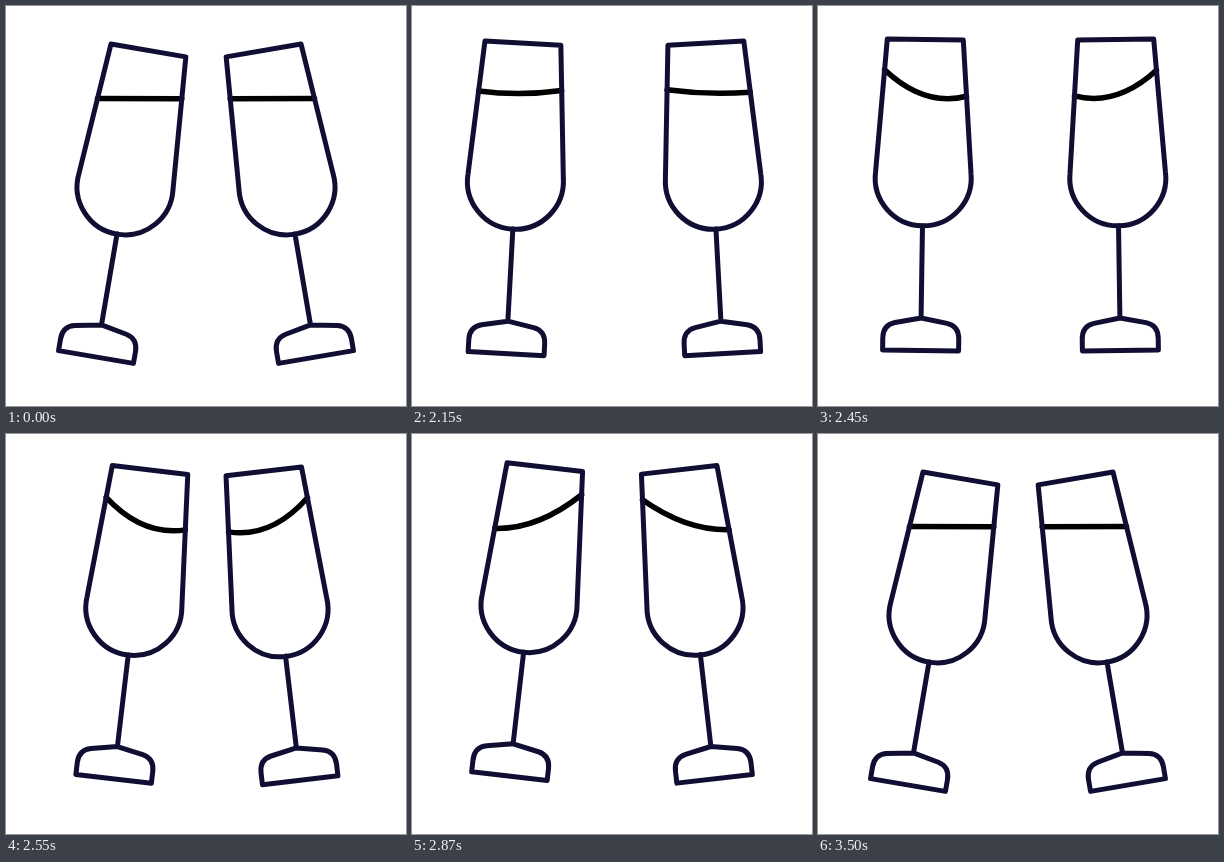
An HTML page for the animation above (3520 ms loop, 400x400 px).

```html
<!DOCTYPE html>
<html lang="en">
<head>
<meta charset="utf-8">
<title>Toast</title>
<style>
html, body { margin: 0; height: 100%; overflow: hidden; background: #fff; }
svg { display: block; width: 100vw; height: 100vh; fill: none; stroke: #100f33; stroke-width: 5; stroke-linejoin: round; stroke-linecap: round; }
.wine { stroke: #000; stroke-width: 5.5; }
</style>
</head>
<body>
<svg viewBox="0 0 400 400">
  <defs>
    <path id="glass" d="M-38-311H38L47.7-178A48 48 0 1 1-47.7-178ZM0-125V-32.5M-38 0V-12C-38-21-33-26-26-27.5L0-32.5 26-27.5C33-26 38-21 38-12V0Z"/>
  </defs>
  <g class="cup"><path class="wine"/><use href="#glass"/></g>
  <g transform="translate(400) scale(-1 1)"><g class="cup"><path class="wine"/><use href="#glass"/></g></g>
</svg>
<script>
const LOOP = 3520;

const clamp = u => Math.min(1, Math.max(0, u));
const progress = (t, start, end) => clamp((t - start) / (end - start));
const pulse = (t, start, end) => Math.sin(Math.PI * progress(t, start, end));
const smooth = u => u * u * (3 - 2 * u);
const easeIn = u => u ** 1.4;
const easeOut = u => 1 - (1 - u) ** 3;
const linear = u => u;

// Foot position and tilt in degrees
const rest = { x: 90, y: 351, tilt: 9.7 };
const apart = { x: 98.5, y: 344, tilt: -4 };
const near = { x: 107.5, y: 345, tilt: 6.7 };
const clink = { x: 115, y: 336.5, tilt: 8.2 };
const rebound = { x: 97.5, y: 342, tilt: 6.5 };

const moves = [
  { start: 1990, end: 2320, from: rest, to: apart, ease: smooth },
  { start: 2320, end: 2550, from: apart, to: near, ease: easeIn },
  { start: 2550, end: 2610, from: near, to: clink, ease: linear },
  { start: 2610, end: 2870, from: clink, to: rebound, ease: linear },
  { start: 2870, end: 3120, from: rebound, to: rest, ease: easeOut }
];

function poseAt(t) {
  const { start, end, from, to, ease } = moves.find(m => t < m.end) || moves[moves.length - 1];
  const u = ease(progress(t, start, end));
  const mix = key => from[key] + (to[key] - from[key]) * u;
  return { x: mix("x"), y: mix("y"), tilt: mix("tilt") };
}

// The wine builds up one swing, rocks back and fades to level
function sloshAt(t) {
  const build = smooth(progress(t, 2000, 2490));
  const fade = 1 - smooth(progress(t, 2870, 3500));
  const phase = 2 * Math.PI * Math.max(0, t - 2490) / 1000;
  return 20 * build * fade * Math.cos(phase);
}

function winePath(slosh) {
  const bend = Math.abs(slosh), mean = -262 - 0.28 * bend, slope = slosh - 7;
  const wallX = y => 38 + (y + 311) * 9.7 / 133;
  const outer = mean - slope, inner = mean + slope;
  return `M${-wallX(outer)} ${outer}Q0 ${-262 + 0.95 * bend} ${wallX(inner)} ${inner}`;
}

const [left, right] = document.querySelectorAll(".cup");

function drawCup(cup, { x, y, tilt }, slosh) {
  cup.setAttribute("transform", `translate(${x} ${y}) rotate(${tilt})`);
  cup.firstChild.setAttribute("d", winePath(slosh));
}

function draw() {
  const t = performance.now() % LOOP;
  const pose = poseAt(t);
  drawCup(left, pose, sloshAt(t));
  // The right glass swings wider, hangs lower and its wine lags
  pose.x -= 7 * pulse(t, 2010, 2600);
  pose.y += 3 * pulse(t, 2450, 3100);
  drawCup(right, pose, sloshAt(t - 20));
  requestAnimationFrame(draw);
}
draw();
</script>
</body>
</html>
```
